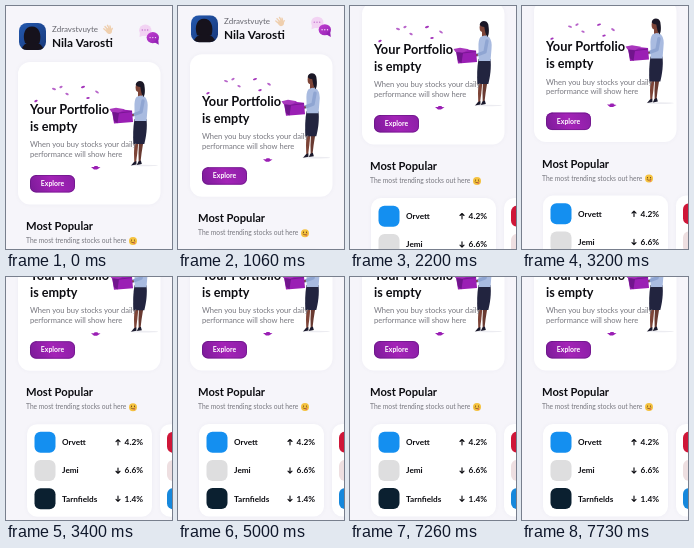
An HTML page with a canvas for the animation above (8 s loop, 166 by 243 pixels).

```html
<!DOCTYPE html>
<html lang="en">
<head>
<meta charset="utf-8">
<title>Portfolio</title>
<style>
html, body { margin: 0; width: 100%; height: 100%; overflow: hidden; background: #f6f5fa; }
canvas { display: block; width: 166px; height: 243px; }
</style>
</head>
<body>
<canvas id="stage"></canvas>
<script>
const W = 166, H = 243, LOOP = 8000;
const canvas = document.getElementById('stage');
const ctx = canvas.getContext('2d');
const dpr = window.devicePixelRatio || 1;
canvas.width = W * dpr;
canvas.height = H * dpr;

const INK = '#0d0d12', GREY = '#77777f', PURPLE = '#9a1fb4', DEEP = '#71158d', SKIN = '#7d4437';

function text(str, x, y, size, weight = 400, color = INK, align = 'left') {
  ctx.font = `${weight} ${size}px Lato, "Open Sans", sans-serif`;
  ctx.fillStyle = color;
  ctx.textAlign = align;
  ctx.fillText(str, x, y);
}

function box(x, y, w, h, r, fill) {
  ctx.fillStyle = fill;
  ctx.beginPath();
  ctx.roundRect(x, y, w, h, r);
  ctx.fill();
}

function card(x, y, w, h, r) {
  ctx.save();
  ctx.shadowColor = 'rgba(60,40,90,.04)';
  ctx.shadowBlur = 5 * dpr;
  box(x, y, w, h, r, '#fff');
  ctx.restore();
}

function oval(x, y, rx, ry, fill, turn = 0) {
  ctx.fillStyle = fill;
  ctx.beginPath();
  ctx.ellipse(x, y, rx, ry, turn, 0, Math.PI * 2);
  ctx.fill();
}

function shape(d, fill) {
  ctx.fillStyle = fill;
  ctx.fill(new Path2D(d));
}

function line(d, color, width) {
  ctx.strokeStyle = color;
  ctx.lineWidth = width;
  ctx.lineCap = ctx.lineJoin = 'round';
  ctx.stroke(new Path2D(d));
}

function gradient(x0, y0, x1, y1, ...colors) {
  const g = ctx.createLinearGradient(x0, y0, x1, y1);
  colors.forEach((c, i) => g.addColorStop(i / (colors.length - 1), c));
  return g;
}

function avatar() {
  ctx.save();
  ctx.beginPath();
  ctx.roundRect(13, 17, 27, 27, 8);
  ctx.clip();
  box(13, 17, 27, 27, 0, gradient(13, 17, 40, 44, '#2459ae', '#17387c'));
  shape('M19 37C16 28 19 20.5 26 20.5S36 28 33.5 37Z', '#16121c');
  shape('M15 45Q17 37 24 36H29Q36 37 38 45Z', '#16121c');
  ctx.restore();
}

function wave() {
  line('M99 20.5L102 24M101.5 19.3L103.5 23M104 20L104.8 23.5M97.8 22.8L101 25.5', '#efcfae', 1.4);
  oval(103, 25, 2.8, 3, '#efcfae', -0.5);
  line('M105.3 24.5L106.3 22.4', '#efcfae', 1.3);
}

function bubbles() {
  oval(139.3, 24.3, 6.2, 5.8, '#f2d3f3');
  shape('M134 26L133.5 31L139 29Z', '#f2d3f3');
  oval(146.8, 31.6, 6.2, 5.6, gradient(142, 25, 153, 38, '#c03fd0', '#9422b4'));
  shape('M148 36L152.8 38.8L152 32Z', '#9422b4');
  for (let i = -1; i < 2; i++) {
    oval(139 + i * 2.7, 24, 0.7, 0.7, '#c069cc');
    oval(146.8 + i * 2.7, 31.6, 0.7, 0.7, '#f6dcf8');
  }
}

function confetti() {
  const bits = [[30, 95, -0.4], [48, 83, 0.3], [55, 81, -0.5], [77, 81, -0.3], [61, 88, 0.4], [91, 86, 0.6], [82, 92, -0.2]];
  bits.forEach(([x, y, turn], i) => oval(x, y, i % 2 ? 2.1 : 1.8, 1, i % 3 ? '#b865ca' : '#a436bb', turn));
  shape('M85 161L88 161L88.5 160H91.5L92 161L94.5 161.3L91 163.5H88Z', PURPLE);
}

function woman() {
  oval(138, 159.5, 14, 0.8, '#ececf1');
  // legs and shoes
  shape('M128.5 135H132.5L131.3 147L130 157H128.3L128 147Z', SKIN);
  shape('M133 135H137.5L135.6 147L134.5 156H132.7L132.5 147Z', '#693a31');
  shape('M130.3 155L130.5 158.5L125 159.5L128 156Z', '#19182b');
  shape('M134.9 154.5L135.8 158L130.8 158.9L132.4 155.5Z', '#19182b');
  // skirt
  shape('M128.5 113H140.5C141.5 122 140 131 138.3 138H127.3C127 130 127 121 128.5 113Z', '#22243f');
  // neck, blouse, arm
  shape('M132 85H136V92H132Z', SKIN);
  shape('M130.5 91Q135 88 139 91Q142.5 95 141.5 103L140.5 115H128.7L128.5 102Q128 94 130.5 91Z', '#a9bbe0');
  line('M137 95L135 106L127 109', '#8fa5d2', 3.4);
  line('M127 109L121.5 110', SKIN, 2);
  // head and hair
  oval(133, 81.5, 3.4, 4.6, SKIN);
  shape('M129.7 79C130 74 137 73.5 138.3 78.5C139 83 139.5 88 137.5 91C135.5 89 135 85 134.3 81Q131.5 81 129.7 79Z', '#1a1726');
}

function parcel() {
  shape('M106 105L111 103L126 104.5L127 116L108 117.5Z', PURPLE);
  shape('M106 105L113 107L111.5 117.3L108 115Z', DEEP);
  shape('M103.5 103L110 101.7L119 103.2L113.5 106.5L105.5 106Z', '#a936bd');
  line('M113 107L125.5 105.5', DEEP, 0.8);
}

function smiley(x, y) {
  oval(x, y, 4, 4, '#f5c23f');
  oval(x - 1.5, y - 0.9, 0.55, 0.7, '#5f3f17');
  oval(x + 1.5, y - 0.9, 0.55, 0.7, '#5f3f17');
  line(`M${x - 2} ${y + 1}Q${x} ${y + 2.7} ${x + 2} ${y + 1}`, '#7a4a18', 0.7);
  oval(x + 1.3, y + 2.2, 0.9, 0.9, '#e4735e');
}

function button() {
  box(24, 169, 45, 17.5, 6, gradient(24, 186, 69, 169, '#7a1b98', '#a423b7', '#8a1fa6'));
  ctx.beginPath();
  ctx.roundRect(24.5, 169.5, 44, 16.5, 5.5);
  ctx.strokeStyle = 'rgba(95,20,125,.55)';
  ctx.lineWidth = 1;
  ctx.stroke();
  text('Explore', 46.5, 180.2, 6.9, 700, '#fff', 'center');
}

function arrow(x, y, dir) {
  line(`M${x} ${y - 2.6 * dir}V${y + 2.6 * dir}M${x - 2} ${y + 0.7 * dir}L${x} ${y + 2.7 * dir}L${x + 2} ${y + 0.7 * dir}`, INK, 1.15);
}

const stocks = [
  ['Orvett', '4.2%', -1, '#148ff0', '#cf1638'],
  ['Jemi', '6.6%', 1, '#dededf', '#eedfe1'],
  ['Tarnfields', '1.4%', 1, '#0b2030', '#1688dc']
];

function page() {
  avatar();
  text('Zdravstvuyte', 46, 26, 8, 400, '#66666e');
  wave();
  text('Nila Varosti', 46, 40.7, 11.8, 700);
  bubbles();

  card(12, 56, 142.5, 142.5, 12);
  confetti();
  woman();
  parcel();
  text('Your Portfolio', 24, 107.8, 12.8, 700);
  text('is empty', 24, 124.8, 12.6, 700);
  text('When you buy stocks your daily', 24, 141, 7.6, 400, GREY);
  text('performance will show here', 24, 150.5, 7.6, 400, GREY);
  button();

  text('Most Popular', 20, 224, 11.2, 700);
  text('The most trending stocks out here', 20, 237.3, 6.7, 400, GREY);
  smiley(127, 235);

  card(21, 252, 125, 92.5, 10);
  card(154, 252, 125, 92.5, 10);
  stocks.forEach(([name, change, dir, color, next], i) => {
    const y = 270.2 + i * 28.2;
    box(28.5, y - 10.5, 21, 21, 6, color);
    box(161, y - 10.5, 21, 21, 6, next);
    text(name, 56, y + 2.9, 8.2, 700);
    arrow(112, y, dir);
    text(change, 137, y + 2.9, 8.3, 700, INK, 'right');
  });
}

function ease(t, from, to, power) {
  const p = Math.min(1, Math.max(0, (t - from) / (to - from)));
  return p < 0.5 ? (2 * p) ** power / 2 : 1 - (2 - 2 * p) ** power / 2;
}

function draw(now) {
  const t = now % LOOP;
  const scroll = 60 * ease(t, 800, 1530, 4) + 45 * ease(t, 3130, 3430, 3);
  ctx.setTransform(dpr, 0, 0, dpr, 0, 0);
  box(0, 0, W, H, 0, '#f6f5fa');
  ctx.translate(0, -scroll);
  page();
  requestAnimationFrame(draw);
}

requestAnimationFrame(draw);
</script>
</body>
</html>
```
